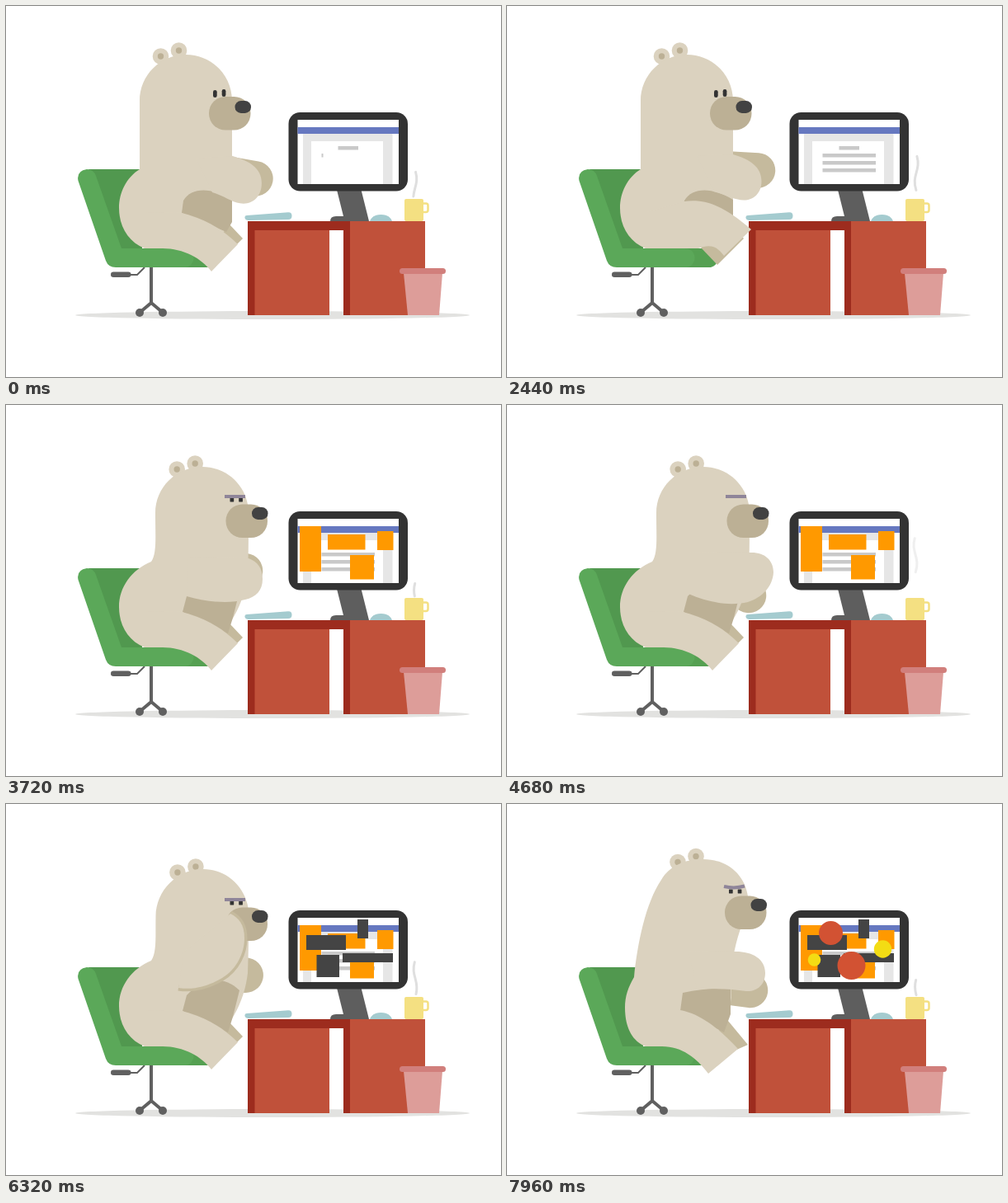
An HTML page that plays this animation: 600x450 px, repeating every 8 s.

```html
<!DOCTYPE html>
<html lang="en">
<head>
<meta charset="utf-8">
<title>Bear at a desk</title>
<style>
html, body { margin: 0; width: 100%; height: 100%; overflow: hidden; background: #fff; }
svg { display: block; width: 100vw; height: 100vh; }
</style>
</head>
<body>
<svg viewBox="0 0 600 450">
  <ellipse cx="323" cy="375" rx="239" ry="5" fill="#e2e2e0"/>

  <g id="chair">
    <path d="M176 315V360L163 371M176 360L189 371" fill="none" stroke="#606060" stroke-width="4"/>
    <circle cx="162" cy="372" r="5" fill="#606060"/>
    <circle cx="190" cy="372" r="5" fill="#606060"/>
    <path d="M150 326H159L168 317" fill="none" stroke="#606060" stroke-width="2"/>
    <rect x="127" y="322.5" width="24.500" height="6.500" rx="3.200" fill="#606060"/>
    <path d="M100 198H165V296H135Z" fill="#51984f"/>
    <rect x="190" y="294" width="66" height="23" rx="11.500" fill="#55a052"/>
    <path d="M98 198Q106 198 109 206L140 294H216A11.500 11.500 0 0 1 216 317H133Q124 317 121 309L87.500 212Q85 200 98 198Z" fill="#5ba859"/>
  </g>

  <g id="desk">
    <path d="M293 261H508V375H409V272H392V375H293Z" fill="#c0513a"/>
    <path d="M293 261H417V375H409V272H301.500V375H293Z" fill="#9d2c1e"/>
    <path d="M482 324H529L525 375H487Z" fill="#dd9d99"/>
    <rect x="477" y="318" width="56" height="7" rx="3.500" fill="#d17f7c"/>
    <path d="M393 261Q393 255 400 255H409L401 223H430.500L440 261Z" fill="#5e5e5e"/>
    <path d="M441 261Q444 253 454.500 253T468 261Z" fill="#a4cbcf"/>
    <path d="M292 254L342 250.200Q346.500 250 346.500 254.500T342 259L294 260Q290 260 289.500 257T292 254Z" fill="#a4cbcf"/>
    <path id="steam" fill="none" stroke="#dfdfdf" stroke-width="3" stroke-linecap="round" pathLength="43"/>
    <rect x="503" y="239.500" width="8.500" height="10.500" rx="2.500" fill="none" stroke="#f4e082" stroke-width="2.500"/>
    <rect x="483" y="234" width="23" height="27" rx="2" fill="#f4e082"/>
  </g>

  <rect x="342.500" y="129" width="144.500" height="95.500" rx="14" fill="#333"/>
  <rect x="353.500" y="138" width="122.500" height="78" fill="#fff"/>
  <path d="M360 155H468.500V216H457V164H370V216H360Z" fill="#e6e6e6"/>
  <path d="M353.500 147H476V155H353.500Z" fill="#6678c0"/>
  <rect x="402.500" y="170" width="24.500" height="4.500" fill="#c9c9c9"/>
  <g id="screen"></g>

  <g id="bear" fill="#dbd2bf">
    <path id="farArm" fill="none" stroke="#c5ba9d" stroke-width="42.500" stroke-linecap="round"/>
    <path id="farLeg" fill="#c5ba9d"/>
    <g id="ears">
      <circle cx="187.500" cy="61" r="9.800"/><circle cx="209.500" cy="54" r="9.800"/>
      <g fill="#bcb095"><circle cx="187.500" cy="61" r="3.700"/><circle cx="209.500" cy="54" r="3.700"/></g>
    </g>
    <path id="body"/>
    <path id="belly" fill="#bcb095"/>
    <path id="leg"/>
    <g id="face">
      <rect id="muzzle" x="246" y="110" width="50.500" height="40.500" rx="20" fill="#bcb095"/>
      <rect id="eyeL" x="251" fill="#333"/>
      <rect id="eyeR" x="261.700" fill="#333"/>
      <path id="brow" fill="none" stroke="#8f8599" stroke-width="4"/>
      <rect id="nose" x="277.500" y="115" width="19.500" height="15" rx="7.300" fill="#424242"/>
    </g>
    <path id="armEdge" fill="none" stroke="#c5ba9d" stroke-width="7"/>
    <path id="arm"/>
  </g>
</svg>
<script>
const $ = id => document.getElementById(id);
const LOOP = 8000;
const clamp = (x, a = 0, b = 1) => Math.min(b, Math.max(a, x));
const ramp = (t, a, b) => clamp((t - a) / (b - a));
const smooth = (t, a, b) => { const k = ramp(t, a, b); return k * k * (3 - 2 * k); };
const lerp = (a, b, k) => a + (b - a) * k;
const set = (el, attrs) => { for (const k in attrs) el.setAttribute(k, attrs[k]); };

// Blend two path strings that share the same commands.
function mix(a, b, k) {
  if (k <= 0) return a;
  if (k >= 1) return b;
  const nums = b.match(/[\d.]+/g);
  let i = 0;
  return a.replace(/[\d.]+/g, n => lerp(+n, +nums[i++], k).toFixed(2));
}

const upright = {
  body: 'M162,198 C162,170 162,140 162,115 C162,84 187,59 218,59 C249,59 274,84 274,115 C274,150 274,200 274,242 C274,270 255,294 220,294 L168,294 C148,286 137,267 137,245 C137,226 146,208 162,198Z',
  belly: 'M213,251 L215,236 C225,219 250,220 274,235 L274,262 L267,274Z',
  leg: 'M213,251 C240,258 262,270 281,289 L249,322 C237,306 215,294 190,294 L170,294 L170,250Z',
  farLeg: 'M255,262 L270,264 L287,282 L255,314 L235,293Z',
  ears: [0, 0], face: [0, 0]
};
const lean = {
  body: 'M176,190 C183,180 181,160 181,131 C181,100 206,75 238,75 C269,75 294,100 294,131 C294,160 294,180 293,205 C288,250 260,294 220,294 L168,294 C148,286 137,267 137,245 C137,221 152,200 176,190Z',
  belly: 'M214,251 L219,232 C235,214 260,204 283,226 L275,258 L269,277Z',
  ears: [19.7, 17], face: [20.5, 10.5]
};
const rise = {
  body: 'M154,210 C158,170 168,120 187,92 C197,75 215,67 238,67 C265,67 288,84 292,112 C290,150 270,160 272,235 C268,260 255,294 220,294 L168,294 C150,287 143,268 143,247 C143,233 147,222 154,210Z',
  belly: 'M210,251 L213,229 C235,224 255,223 271,224 L271,255 L263,277Z',
  leg: 'M210,250 C238,255 262,278 280,297 L244,327 C230,308 212,294 188,294 L170,294 L170,250Z',
  farLeg: 'M255,262 L268,263 L292,292 L276,299 L240,300Z',
  ears: [19.5, 9.5], face: [18, 1.5]
};
const kickLeg = 'M215,237 C245,233 268,247 296,271 L263,303 C255,292 247,288 232,294 L170,294 L170,250Z';

const arms = {
  uprightLow: 'M230,185 L274,182 C295,188 310,197 310,215 C310,231 300,240 288,240 C275,240 268,232 250,226Z',
  uprightHigh: 'M230,178 L274,178 C295,184 307,194 307,210 C307,224 297,231 286,231 C276,231 270,228 250,224Z',
  leanLow: 'M220,185 L294,186 C305,190 311,198 311,211 C311,225 303,233 290,236 C268,242 240,238 219,232Z',
  leanHigh: 'M220,180 L294,179 C312,178 323,188 323,203 C322,220 310,233 292,239 C270,244 245,240 220,229Z',
  chin: 'M215,180 L272,133 C282,138 289,146 289,163 C289,180 280,200 262,211 C245,221 228,226 209,223Z',
  rise: 'M220,180 L274,179 C296,178 313,187 313,205 C313,220 302,228 290,227 C272,224 250,224 230,224Z'
};

function add(tag, fill) {
  const el = document.createElementNS('http://www.w3.org/2000/svg', tag);
  el.setAttribute('fill', fill);
  $('screen').append(el);
  return el;
}
const group = (tag, fill, list) => list.map(v => ({ el: add(tag, fill), v }));

const lines = group('rect', '#c9c9c9', [[179], [188], [197]]);
const ads = group('rect', '#ff9900', [
  [356, 147, 26, 55], [450, 153, 19.5, 23], [390, 157, 45.5, 18.5], [417, 182, 29, 29.5]
]);
const bars = group('rect', '#444', [
  [364, 159, 48, 18, 'up'], [426, 140, 13, 23, 'down'],
  [376.5, 183, 27.5, 27, 'down'], [408, 181, 61, 11, 'right']
]);
const dots = [
  ...group('circle', '#d25233', [[392.5, 156.5, 14.5], [417.5, 196, 17]]),
  ...group('circle', '#f3dc14', [[455.5, 176, 10.7], [372.5, 189, 7.8]])
];

function drawScreen(t) {
  const typed = 2 + t * .19;
  lines.forEach(({ el, v: [y] }, i) =>
    set(el, { x: 382.5, y, height: 4.5, width: clamp(typed - i * 64.5, 0, 64.5) }));

  ads.forEach(({ el, v: [x, y, w, h] }, i) => {
    const k = smooth(t, 2760 + i * 120, 2960 + i * 120);
    set(el, { x: x + w * (1 - k) / 2, y: y + h * (1 - k) / 2, width: w * k, height: h * k });
  });

  bars.forEach(({ el, v: [x, y, w, h, dir] }, i) => {
    const k = ramp(t, 5320 + i * 40, 5960 + i * 40);
    const side = dir === 'right';
    set(el, {
      x, y: dir === 'up' ? y + h * (1 - k) : y,
      width: side ? w * k : k > 0 ? w : 0,
      height: side ? h : h * k
    });
  });

  dots.forEach(({ el, v: [cx, cy, r] }, i) =>
    set(el, { cx, cy, r: r * smooth(t, 7590 + i * 40, 7820 + i * 40) }));
}

// Start time and bend direction of each wisp.
const puffs = [[-340, 1], [1842, 1], [3543, -1], [5860, -1], [7753, -1]];

function drawSteam(t) {
  const puff = puffs.find(([s]) => t >= s && t < s + 1300);
  if (!puff) return set($('steam'), { opacity: 0 });
  const [start, dir] = puff;
  const u = (t - start) / 1300;
  const up = 75 * (1 - (1 - u) ** 2);
  const x = 496 + dir * 2 * u, y = 235.5 - up;
  set($('steam'), {
    d: `M${x},${y}c${5 * dir},17 ${-7 * dir},23 ${-dir},41`,
    'stroke-dasharray': `${clamp(up - 3, 0.1, 43)} 99`,
    opacity: 1 - ramp(u, .8, .95)
  });
}

function drawBear(t) {
  const bend = smooth(t, 2640, 3040);
  const chin = smooth(t, 5120, 5420) - smooth(t, 6380, 6680);
  const up = ramp(t, 7600, 7960) ** 1.5;
  const look = smooth(t, 6740, 6880) * (1 - up);
  const kick = smooth(t, 2080, 2400) - smooth(t, 2640, 2960);

  const blend = part => mix(mix(upright[part], lean[part] || upright[part], bend), rise[part], up);
  const shift = part => [0, 1].map(i =>
    lerp(lerp(upright[part][i], lean[part][i], bend), rise[part][i], up));

  set($('body'), { d: blend('body') });
  set($('belly'), { d: blend('belly') });
  set($('farLeg'), { d: blend('farLeg') });
  set($('leg'), { d: mix(blend('leg'), kickLeg, kick) });

  // Typing pauses while the hand is at the chin and before the bear sits up.
  const clock = Math.min(t, 5100) - 2440 + clamp(t - 6700, 0, 460);
  const angle = clock / 640 * 2 * Math.PI;
  const swing = Math.cos(angle);

  const straight = mix(arms.uprightHigh, arms.uprightLow, .5 + Math.sin(angle) / 2);
  const bent = mix(arms.leanLow, arms.leanHigh, .5 - swing / 2);
  const arm = mix(mix(mix(straight, bent, bend), arms.chin, chin), arms.rise, up);
  set($('arm'), { d: arm });
  set($('armEdge'), { d: arm.replace(/^M\S+ L/, 'M').replace('Z', ''), opacity: chin });

  const hx = lerp(lerp(301.5 + 2.5 * swing, 291.5 - 1.5 * swing, bend), 295, up);
  const hy = lerp(lerp(215.5 - 16 * swing, 216 - 15 * swing, bend), 226, up);
  const sy = lerp(hy, 201, .45);
  set($('farArm'), { d: `M264,${lerp(sy - 3, hy - 4, up)}L${hx},${hy}` });

  const [ex, ey] = shift('ears'), [fx, fy] = shift('face');
  const nod = 5 * chin;
  set($('ears'), { transform: `translate(${ex + chin * .7},${ey + nod})` });
  set($('face'), { transform: `translate(${fx},${fy + nod})` });
  set($('body'), { transform: `translate(0,${nod * .8})` });
  if (chin > 0) {
    // Only the head sinks; the seat stays where it is.
    set($('body'), { transform: '', d: lean.body
      .replace('181,131 C181,100 206,75 238,75 C269,75 294,100 294,131',
        `181.5,${131 + nod} C182,${100 + nod} 207,${75 + nod * .8} 239,${75 + nod * .8} C270,${75 + nod * .8} 294.5,${100 + nod} 294.5,${131 + nod}`) });
  }

  const blink = 1 - Math.sin(Math.PI * ramp(t, 4600, 4760));
  const lid = bend * (1 - look);
  const h = lerp(9, 5, lid) * lerp(1, blink, bend);
  const eye = { width: 4.7, height: h, rx: lerp(2.3, .4, lid) };
  set($('eyeL'), { ...eye, y: 102 });
  set($('eyeR'), { ...eye, y: lerp(101, 102, bend) });

  const flat = 'M244.5,100.5 Q257,100.5 269.5,100.5';
  const arch = mix(flat, 'M244.5,100.5 Q257,93 270.5,100.5', look);
  set($('brow'), { d: mix(arch, 'M245,98.5 Q258,101.5 270,98', up), opacity: bend });

  set($('muzzle'), { transform: `translate(0,${-3.5 * look}) rotate(${-24 * look} 271 130)` });
  set($('nose'), { transform: `translate(${-5.5 * look},${-18 * look - bend * (1 - look) * 1.5})` });
}

function render(t) {
  drawScreen(t);
  drawSteam(t);
  drawBear(t);
}

let start;
function tick(now) {
  start ??= now;
  render((now - start) % LOOP);
  requestAnimationFrame(tick);
}
render(0);
requestAnimationFrame(tick);
</script>
</body>
</html>
```
